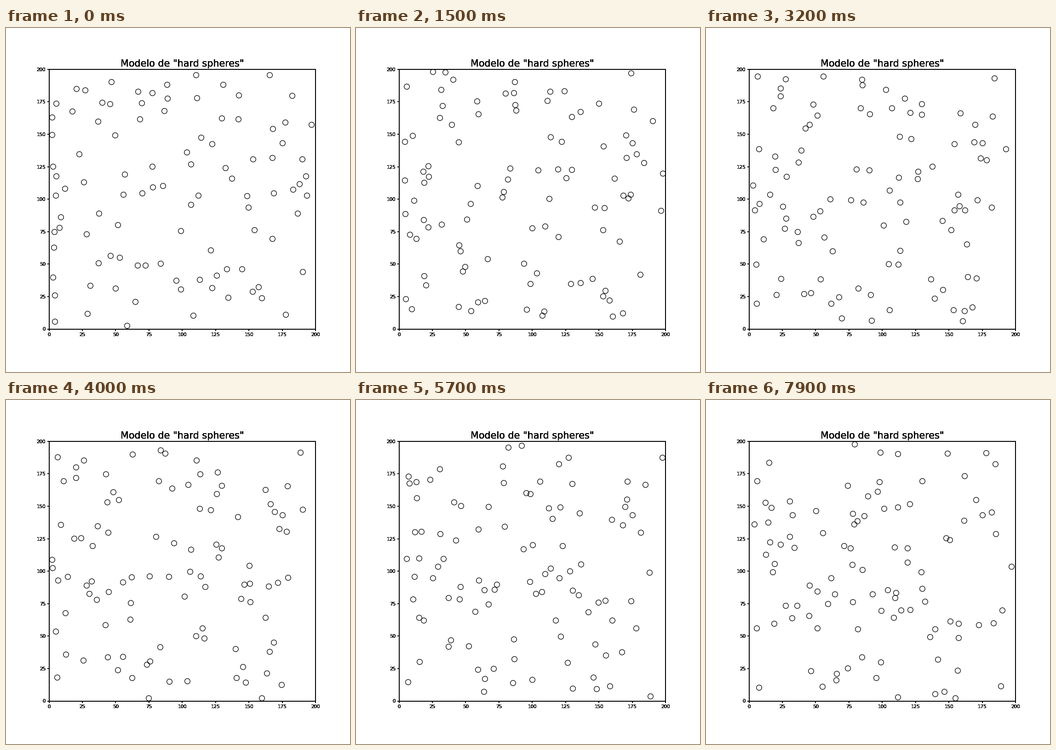
A matplotlib script that plays this animation: 748 by 748 pixels, repeating every 8000 ms.

```python
import numpy as np
import matplotlib.pyplot as plt
from matplotlib.animation import FuncAnimation

SIZE, FRAMES, STEP_MS = 748, 80, 100
SIDE, RADIUS, BALLS = 200, 2, 100
CONTACT, SPACING, SPEED = 3.5, 4.8, 0.57
BOX = [0.125, 0.125, 0.775, 0.755]
LAYERS = 6

plt.rcParams.update({
    "font.family": "DejaVu Sans", "font.size": 10,
    "axes.titlesize": 20, "axes.linewidth": 1.5,
    "xtick.major.width": 1.5, "ytick.major.width": 1.5,
})

# A few balls keep their course: x, y, speed in x, speed in y.
LEADERS = np.array([
    (175.0, 143.4, 0, 0),
    (129.6, 162.2, 0.003, 0.092),
    (182.2, 179.9, -0.398, -0.708),
    (165.3, 195.5, 0.583, 0.227),
    (130.5, 188.4, -0.432, -0.341),
    (132.2, 124.0, -0.170, -0.081),
    (187.8, 111.6, -0.934, -0.528),
    (167.8, 154.4, -0.952, -0.914),
])


def fold(p):
    """Reflect straight paths back and forth between the walls."""
    span = SIDE - 2 * RADIUS
    return RADIUS + span - np.abs((p - RADIUS) % (2 * span) - span)


def lead(t):
    return fold(LEADERS[:, :2] + LEADERS[:, 2:] * t)


def place_balls(rng):
    """Fill the box at random without overlaps, denser on the left."""
    pos = list(lead(0))
    while len(pos) < BALLS:
        p = RADIUS + rng.random(2) ** (1.25, 1) * (SIDE - 2 * RADIUS)
        if np.linalg.norm(np.array(pos) - p, axis=1).min() > SPACING:
            pos.append(p)
    return np.array(pos)


def collide(pos, vel):
    """Equal masses swap their speeds along the line of contact."""
    delta = pos[None] - pos[:, None]
    dist = np.linalg.norm(delta, axis=2)
    for i, j in np.argwhere(np.triu(dist < CONTACT, 1)):
        normal = delta[i, j] / dist[i, j]
        closing = (vel[j] - vel[i]) @ normal
        if closing < 0:
            vel[i] += closing * normal
            vel[j] -= closing * normal


def simulate():
    rng = np.random.default_rng(7)
    n = len(LEADERS)
    pos = place_balls(rng)
    vel = rng.normal(0, SPEED, pos.shape)
    states = [pos]
    for t in range(1, FRAMES):
        vel[:n] = lead(t) - pos[:n]
        ahead = pos + vel
        vel = np.where(ahead < RADIUS, np.abs(vel), vel)
        vel = np.where(ahead > SIDE - RADIUS, -np.abs(vel), vel)
        pos = fold(ahead)
        pos[:n] = lead(t)
        collide(pos, vel)
        states.append(pos)
    return states


def add_frame(layer):
    ax = fig.add_axes(BOX, label=f"layer{layer}", facecolor="none")
    ticks = range(0, SIDE + 1, 25)
    ax.set(xlim=(0, SIDE), ylim=(0, SIDE), xticks=ticks, yticks=ticks,
           title='Modelo de "hard spheres"')
    return ax


states = simulate()
fig = plt.figure(figsize=(10, 10), dpi=SIZE / 10, facecolor="white")

# Stacked frames give the heavy, built-up edges of the text.
ax = [add_frame(k) for k in range(LAYERS)][-1]
balls, = ax.plot([], [], "o", ms=11.2, mew=1.2, mfc="none", mec="black")


def update(i):
    balls.set_data(*states[i].T)
    return balls,


anim = FuncAnimation(fig, update, frames=FRAMES, interval=STEP_MS,
                     repeat=True, repeat_delay=0, blit=False)
plt.show()
```
